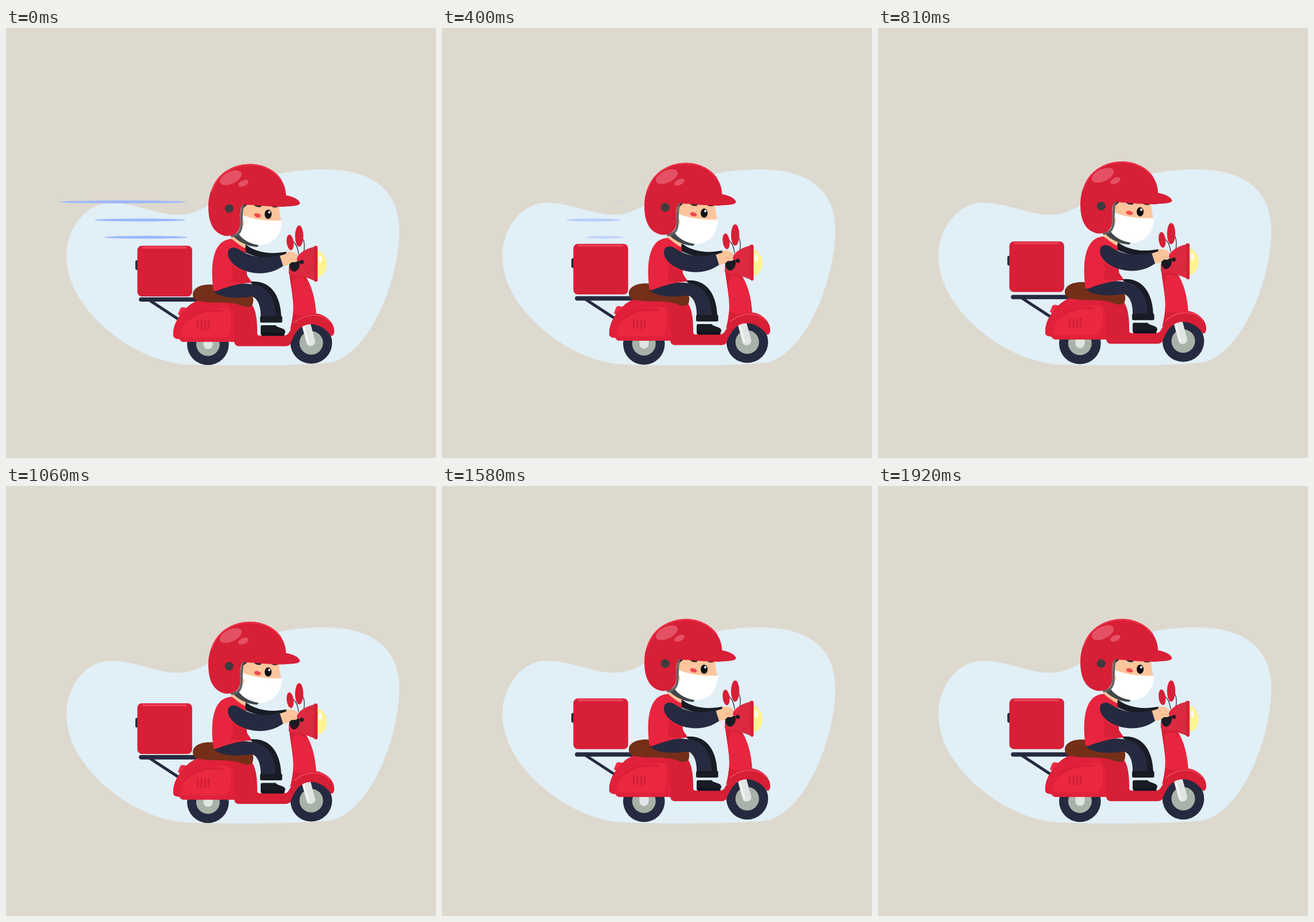
These frames come from a looping animation (748x748 px, 2000 ms). An HTML page:

```html
<!DOCTYPE html>
<html lang="en">
<head>
<meta charset="utf-8">
<title>Scooter delivery</title>
<style>
  html, body { margin: 0; width: 100%; height: 100%; overflow: hidden; background: #ded9ce; }
  svg { display: block; width: 100vw; height: 100vh; }
  .red { fill: #d71f36; }
  .bright { fill: #e8253e; }
  .navy { fill: #262a40; }
  .black { fill: #191c24; }
  .skin { fill: #fdc59c; }
  .line { fill: none; stroke-linecap: round; stroke-linejoin: round; }
</style>
</head>
<body>
<svg viewBox="0 0 748 748">
  <path fill="#e1eff7" d="M105 397C105 350 138 304 182 304C225 304 262 325 300 325C365 325 395 246 553 246C650 246 684 292 684 353C684 430 640 555 572 580C545 589 330 588 300 584C211 572 105 485 105 397Z"/>

  <g id="streaks" fill="#9bb8fd"></g>

  <!-- rear wheel -->
  <g data-lift="1.8">
    <circle class="navy" cx="351.3" cy="550" r="36.3"/>
    <circle cx="351.3" cy="550" r="20.5" fill="#a9b2a9"/>
    <rect x="343.5" y="530" width="16" height="28.5" rx="8" fill="#e1e5e3"/>
  </g>

  <!-- front wheel -->
  <g data-lift="3.8">
    <circle class="navy" cx="531" cy="547.7" r="36.3"/>
    <circle cx="531" cy="547.7" r="20.5" fill="#a9b2a9"/>
  </g>
  <g data-lift="4.3">
    <path fill="#e1e5e3" d="M513 512L528 508L538 545C539 553 526 557 523 549Z"/>
    <path class="line" stroke="#f3f5f4" stroke-width="3" d="M517 515L526 548"/>
  </g>

  <!-- box -->
  <g data-lift="9.3">
    <rect class="navy" x="225" y="404" width="8" height="17" rx="3"/>
    <rect class="red" x="228.5" y="378.8" width="95.3" height="88.2" rx="8"/>
    <rect x="236" y="380.3" width="79" height="3.4" rx="1.7" fill="#ee4056"/>
  </g>

  <g data-lift="5.3">
    <!-- rack -->
    <path class="line" stroke="#262a40" stroke-width="5" d="M250 474L302 508"/>
    <path class="line" stroke="#262a40" stroke-width="7.6" d="M235 472.3H335"/>

    <!-- rear body and floor -->
    <path fill="#f02c43" d="M299 498L303 488Q305 485 310 486L318 488L306 503Z"/>
    <path class="red" d="M291 532C291 512 305 496 316 485C328 474 345 468 365 468L415 469C434 480 437 500 437 531Q437 535 441 535H484Q490 535 493 528L500 518L515 515C502 524 497 536 496 546Q495 553.500 486 553.500H404Q398 553 397 546H308Q303 545 302 541C294 541 290 538 291 532Z"/>
    <path fill="#e02139" d="M291 532C291 512 305 496 316 485C324 478 335 473 347 475L380 477C393 484 403 500 397 546H308Q303 545 302 541C294 541 290 538 291 532Z"/>
    <path fill="#ea2840" d="M305 536C306 505 332 488 378 487Q391 487 391 499C392 515 390 527 386 534Q384 538 378 538H309Q305 539 305 536Z"/>
    <path class="red" d="M312 513C319 497 342 488 374 490Q379 491 377 494C350 491 329 498 312 513Z"/>
    <path class="line" stroke="#d21e35" stroke-width="3" d="M333.5 510V523M340 510V525M346.5 510V525M352.5 510V523"/>

    <!-- front shield and fender -->
    <path class="bright" d="M492 415L520 430C532 448 538 470 540 500L495 524C499 505 501 490 499 472C497 450 493 436 492 415Z"/>
    <path class="red" d="M492 414L520 426L523 440C515 433 505 431 500 437C496 447 502 470 499 495C507 501 522 500 531 498C516 501 505 511 494 525C499 505 501 490 499 472C497 450 493 436 492 414Z"/>
    <path class="red" d="M484 553.500C493 545 494 524 503 512C515 500 530 496 542 497C559 500 571 514 571 527C571 533 568 537 565 535C554 520 538 513 524 516C507 520 501 535 496 546Q492 553.500 484 553.500Z"/>
    <path class="line" stroke="#ee4056" stroke-width="2" d="M501 513C520 496 550 495 564 511"/>

    <!-- seat -->
    <path fill="#752f19" d="M325 464C325 451 341 445 360 446.5C370 447 375 454 386 458L425 461C431 466 431 475 429 481C425 487 416 486 407 482C391 475 365 480 343 476C332 476 325 472 325 464Z"/>

    <!-- legs -->
    <path class="black" d="M424 441.500C461 437 479 467 479 507H460L440 456Z"/>
    <path class="navy" d="M361 458C378 448 402 443 421 445C453 446 470 467 469 506H443C444 486 439 471 428 467C403 471 374 471 361 458Z"/>
    <rect class="black" x="442" y="501" width="38.5" height="11.5" rx="2.5"/>
    <path class="black" d="M446 517H469C474 523 486 521 486 529L484 532H443V520Q443 517 446 517Z"/>
    <path fill="#11141d" d="M443 530H485L484 535.500H446Q443 535 443 530Z"/>

    <!-- far arm and torso -->
    <path class="black" d="M414 374C432 390 458 395 488 389L491 399C463 405 435 400 414 389Z"/>
    <path class="skin" d="M487 390C495 387 504 390 508 396L505 400H489Z"/>
    <path class="bright" d="M361 457.5C357 429 356 391 374 374C386 365 400 364 416 374L419 429C422 436 427 439 426 443C403 444 379 452 365 458Z"/>
    <path class="red" d="M392 411C400 420 409 424 419 425V430C422 436 427 439 426 443C414 443 402 443 391 441C396 430 396 420 392 411Z"/>
    <path class="skin" d="M391 366L396 358L418 372L416 383C408 380 399 371 391 366Z"/>

    <!-- mirrors, handle and headlight -->
    <path class="line" stroke="#262a40" stroke-width="1.3" d="M499 371C505 376 507 381 509 393M516.5 367C521 376 519 390 514 406"/>
    <ellipse class="red" cx="494.3" cy="373" rx="6" ry="13.7" transform="rotate(-7 494.3 373)"/>
    <ellipse class="red" cx="510" cy="362" rx="7.2" ry="18.5"/>
    <path fill="#fef38e" d="M541 387C551 389 557.500 399 557.500 411C557.500 423 551 432 541 434Z"/>
    <ellipse cx="546.7" cy="402" rx="3.2" ry="7" fill="#fffde9"/>
    <path fill="#db2940" d="M538 380C521 384 510 391 506 401C497 407 491 414 492 427Q498 432 512 430L538 440Z"/>
    <path class="bright" d="M506 401C507 395 514 390 522 387L513 399L510 407Z"/>
    <path class="red" d="M536 379H540Q542 379 542 382V438Q542 441.500 539 441.500L536 440Z"/>
    <path class="black" d="M492 407L510 405C513 414 508 423 501 424C494 423 493 415 492 407Z"/>
    <circle class="black" cx="514.5" cy="407" r="3.5"/>

    <!-- near arm -->
    <path class="skin" d="M474 397L490 392C498 394 507 400 507 405C504 409 499 406 496 408C491 414 486 413 479 415Z"/>
    <path class="line" stroke="#eaa77e" stroke-width="1" d="M493 402C498 401 502 403 505 405"/>
    <path class="navy" d="M386 392C386 382 396 379 405 385C425 399 450 402 476 395L482 414C458 431 427 430 404 417C392 409 386 401 386 392Z"/>

    <!-- face -->
    <path fill="#42474b" d="M394 361L404 356C412 368 424 376 440 377L437 381C420 380 404 372 394 361Z"/>
    <path class="skin" d="M408 303H476C474 316 477 326 479 336L430 350L407 348Z"/>
    <path fill="#fff" d="M411 325C430 333 450 336 480 335C480 361 463 378 441 378C422 375 409 366 404 357C411 351 414 344 412 334Z"/>
    <path class="skin" d="M408 332C416 333 417 344 407 349Z"/>
    <ellipse cx="437.500" cy="326" rx="6" ry="3.500" fill="#ef4a50" transform="rotate(14 437.5 326)"/>
    <ellipse cx="456" cy="324" rx="6" ry="8" fill="#101014"/>
    <ellipse cx="458" cy="320.500" rx="1.800" ry="2.300" fill="#fff"/>
    <path fill="#25262b" d="M410 305H422L412 314ZM432 307H444V311Q438 313 432 309ZM461 307H473V311Q467 314 461 310Z"/>

    <!-- helmet -->
    <path class="line" stroke="#606264" stroke-width="4" d="M413 307C408 316 411 333 409 348C407 357 401 361 393 362"/>
    <path class="red" d="M352 311C352 266 385 237 424 236.500C460 236 487 262 487 291C499 293 510 298 511.500 305C508 311 495 309 482 311C460 311 435 308 412 307C405 313 409 331 407 346C404 359 392 363 381 361.500C362 357 352 341 352 311Z"/>
    <path class="line" stroke="#ef2f48" stroke-width="2.500" d="M358 284C367 254 394 238 424 237.700C449 238 468 249 478 264"/>
    <ellipse cx="391" cy="260.500" rx="20.500" ry="10.500" fill="#e55164" transform="rotate(-25 391 260.5)"/>
    <ellipse cx="413" cy="270" rx="9.500" ry="5" fill="#e55164" transform="rotate(-25 413 270)"/>
    <circle cx="388.200" cy="314" r="7.500" fill="#3c3c3e"/>
  </g>
</svg>
<script>
const LOOP = 2000, LAST = 1920, BOUNCE = 348, FADE = 495;
const streaks = [
  { left: 91, right: 314, y: 302.5, start: -18 },
  { left: 154, right: 312, y: 334, start: 189 },
  { left: 171, right: 316, y: 364, start: 138 },
];
const lifted = [...document.querySelectorAll('[data-lift]')];
const holder = document.getElementById('streaks');
for (const s of streaks) {
  s.node = holder.appendChild(document.createElementNS('http://www.w3.org/2000/svg', 'ellipse'));
  s.node.setAttribute('cy', s.y);
}

const clamp = v => Math.min(1, Math.max(0, v));
const smooth = u => u * u * (3 - 2 * u);

function draw(time) {
  const t = Math.min(time, LAST);
  const rise = Math.abs(Math.sin(Math.PI * t / BOUNCE)) ** 1.3;
  for (const part of lifted) {
    part.setAttribute('transform', `translate(0 ${-rise * part.dataset.lift})`);
  }
  // streaks retract to their right ends while fading
  for (const s of streaks) {
    const u = clamp((t - s.start) / FADE);
    const half = (s.right - s.left) / 2 * (1 - smooth(u));
    s.node.setAttribute('cx', s.right - half);
    s.node.setAttribute('rx', half);
    s.node.setAttribute('ry', 2.5);
    s.node.setAttribute('opacity', 1 - u);
  }
}

const begin = performance.now();
function tick() {
  draw((performance.now() - begin) % LOOP);
  requestAnimationFrame(tick);
}
draw(0);
requestAnimationFrame(tick);
</script>
</body>
</html>
```
